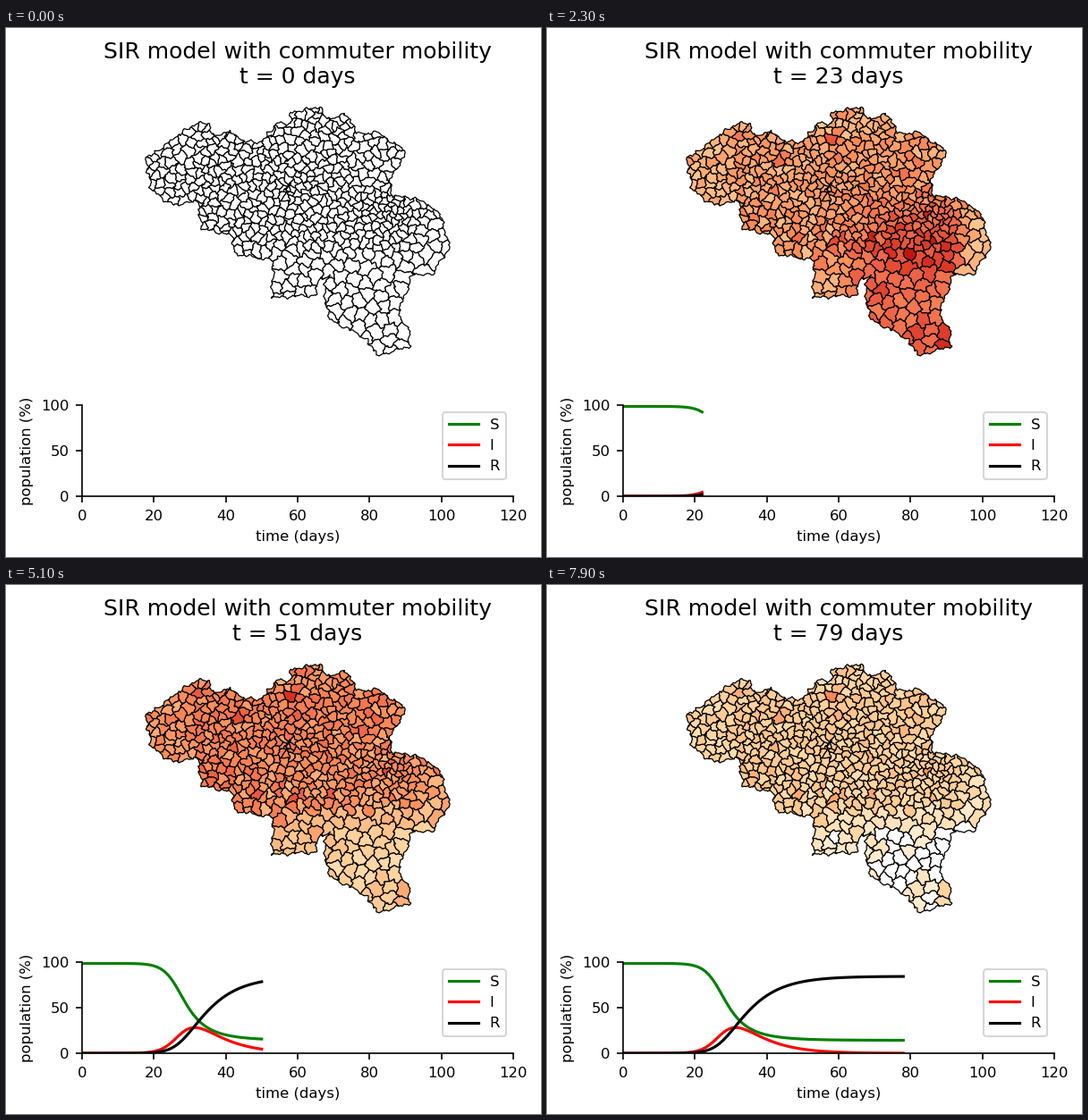
These frames come from a looping animation (598 by 592 pixels, 8000 ms). A matplotlib script:

```python
import matplotlib.pyplot as plt
import numpy as np
from matplotlib.animation import FuncAnimation
from matplotlib.collections import PolyCollection
from matplotlib.patches import Polygon
from matplotlib.path import Path

W, H, DPI = 598, 592, 150
DAYS, PEAK = 80, 31.3
rng = np.random.default_rng(12)

# corners of the country outline, clockwise from the west
BORDER = np.array([
    (156, 146), (212, 107), (227, 107), (231, 120), (250, 116), (266, 127),
    (283, 128), (304, 106), (318, 107), (319, 94), (331, 92), (352, 88),
    (358, 100), (371, 102), (379, 95), (393, 119), (414, 117), (447, 137),
    (428, 175), (432, 188), (460, 191), (485, 207), (496, 247), (474, 277),
    (455, 274), (438, 320), (452, 341), (450, 357), (415, 366), (403, 348),
    (361, 325), (355, 290), (361, 277), (349, 283), (345, 299), (297, 302),
    (299, 260), (257, 253), (252, 232), (219, 224), (214, 194), (186, 198),
    (163, 182)], float)

# x, y, extra size of the larger towns; the outbreak starts in the last one
TOWNS = np.array([
    (318, 124, .22), (258, 150, .15), (214, 121, .12), (231, 211, .1),
    (281, 234, .13), (321, 238, .16), (362, 233, .17), (425, 209, .2),
    (444, 342, .04)])


def smooth(v, lo, hi):
    u = np.clip((v - lo) / (hi - lo), 0, 1)
    return u * u * (3 - 2 * u)


def bump(p, x, y, size):
    return np.exp(-((p[:, 0] - x) ** 2 + (p[:, 1] - y) ** 2) / size ** 2)


def spacing(p):
    """Distance between districts: tight in cities, wide in the south."""
    x, y = p.T
    r = 6.7 + 4 * smooth(y, 235, 275) + 1.8 * smooth(x, 375, 405) * (y < 180)
    r += 1.2 * smooth(-x, -215, -185) + 3 * smooth(x, 445, 475) * (y > 212)
    return r - 4.4 * bump(p, 318, 180, 12) - 2.4 * bump(p, 428, 206, 22)


def warp(p):
    """Wobble positions so that straight borders look natural."""
    x, y = p.T
    dx, dy = 0, 0
    for freq, amp in ((.3, 1.1), (.62, 1), (1.4, .55)):
        dx = dx + amp * np.sin(freq * y + 2 * np.sin(.2 * x))
        dy = dy + amp * np.sin(freq * x + 2 * np.sin(.19 * y))
    return p + np.column_stack([dx, dy])


def rough(poly, step=1.5):
    pts = []
    for a, b in zip(poly, np.roll(poly, -1, axis=0)):
        n = max(1, int(round(np.hypot(*(b - a)) / step)))
        pts.append(a + (b - a) * (np.arange(n) / n)[:, None])
    return warp(np.vstack(pts))


def scatter_seeds(tries=18000):
    pts = rng.uniform((150, 85), (500, 368), (tries, 2))
    pts = pts[Path(BORDER).contains_points(pts)]
    seeds = list(TOWNS[:, :2])
    radii = list(spacing(TOWNS[:, :2]) + 2)
    for p, r in zip(pts, spacing(pts)):
        d = np.hypot(*(np.array(seeds) - p).T)
        if (d > np.maximum(r, radii)).all():
            seeds.append(p)
            radii.append(r)
    return np.array(seeds)


def cut(poly, mid, normal):
    """Keep the part of a convex polygon behind a line."""
    side = [(x - mid[0]) * normal[0] + (y - mid[1]) * normal[1] for x, y in poly]
    out = []
    for i, (b, sb) in enumerate(zip(poly, side)):
        a, sa = poly[i - 1], side[i - 1]
        if sa * sb < 0:
            k = sa / (sa - sb)
            out.append((a[0] + k * (b[0] - a[0]), a[1] + k * (b[1] - a[1])))
        if sb <= 0:
            out.append(b)
    return out


def cell(seeds, i, reach=40):
    x, y = seeds[i]
    poly = [(x - reach, y - reach), (x + reach, y - reach),
            (x + reach, y + reach), (x - reach, y + reach)]
    order = np.argsort(np.hypot(*(seeds - seeds[i]).T))
    for j in order[1:40]:
        poly = cut(poly, (seeds[i] + seeds[j]) / 2, seeds[j] - seeds[i])
    return np.array(poly)


def sir(days, beta=.612, gamma=.17, mixing=1.45, total=98.6, dt=.05):
    """Epidemic curves in percent, aligned to the peak day."""
    s, i, track = 1 - 1e-7, 1e-7, []
    for _ in range(int(125 / dt)):
        track.append((s, i))
        new = beta * s ** mixing * i * dt
        s, i = s - new, i + new - gamma * i * dt
    s, i = np.array(track).T
    t = (np.arange(len(i)) - i.argmax()) * dt + PEAK
    s, i = (total * np.interp(days, t, v) for v in (s, i))
    return s, i, total - s - i


seeds = scatter_seeds()
cells = [rough(cell(seeds, i)) for i in range(len(seeds))]

# every district follows the same wave, shifted in time and in size
sx, sy = seeds.T
towns = len(TOWNS)
east = smooth(sx, 452, 478) * (sy < 282)
size = rng.normal(0, .045, len(seeds))
size[:towns] = TOWNS[:, 2]
size -= .15 * smooth(sy, 240, 280) + .07 * east + .07 * smooth(-sx, -215, -180)
size[towns - 1] = .04
lead = 11 * bump(seeds, 420, 310, 95) * (1 - .8 * east)
lead[towns - 1] = 16
cmap = plt.get_cmap("OrRd")


def district_colors(t):
    past = t + lead * min(t / 4, 1) - PEAK
    level = np.where(past < 0, .8 + .043 * past, .8 * np.exp(-past / 48)) + size
    rgba = cmap(np.clip(level, 0, 1))
    rgba[level < .09] = 1
    return rgba


plt.rcParams.update({"font.family": "DejaVu Sans", "font.size": 7.9})
fig = plt.figure(figsize=(W / DPI, H / DPI), dpi=DPI, facecolor="white")

area = fig.add_axes([0, 0, 1, 1])
area.set(xlim=(0, W), ylim=(H, 0))
area.axis("off")
shape = Polygon(rough(BORDER), fill=False, ec="black", lw=.6, zorder=3)
area.add_patch(shape)
districts = PolyCollection(cells, edgecolors="black", linewidths=.6)
area.add_collection(districts, autolim=False)
districts.set_clip_path(shape)

area.text(326, 34, "SIR model with commuter mobility", size=12, ha="center")
clock = area.text(326, 62, "", size=12, ha="center")

ax = fig.add_axes([85 / W, 1 - 524 / H, 482 / W, 102 / H])
ax.patch.set_visible(False)
ax.set(xlim=(0, 120), ylim=(0, 100), xticks=range(0, 121, 20),
       yticks=(0, 50, 100), xlabel="time (days)", ylabel="population (%)")
ax.spines[["top", "right"]].set_visible(False)
lines = [ax.plot([], [], color=c, label=n)[0]
         for n, c in zip("SIR", ("green", "red", "black"))]
ax.legend(loc="upper right")

day = np.arange(DAYS)
curves = sir(day)


def update(t):
    clock.set_text(f"t = {t} days")
    districts.set_facecolor(district_colors(t))
    for line, values in zip(lines, curves):
        line.set_data(day[:t], values[:t])
    return [clock, districts, *lines]


anim = FuncAnimation(fig, update, frames=DAYS, interval=100, repeat=True,
                     repeat_delay=0, blit=False)
plt.show()
```
